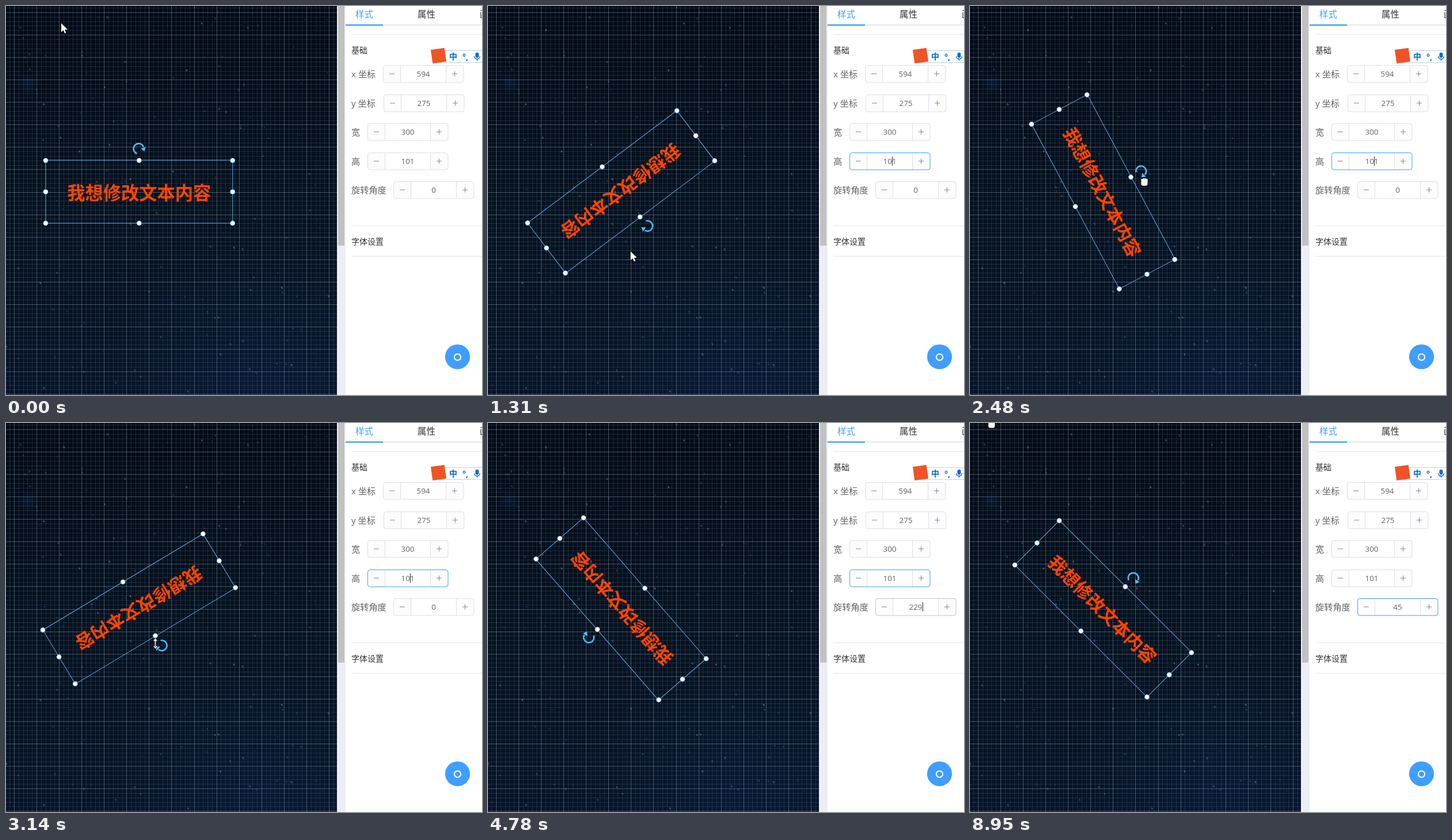
An HTML page with a canvas for the animation above (9.11 s loop, 827 by 677 pixels).

```html
<!DOCTYPE html>
<html lang="zh">
<head>
<meta charset="utf-8">
<title>旋转角度</title>
<style>
html, body { margin: 0; width: 100%; height: 100%; overflow: hidden; background: #fff; }
canvas { display: block; width: 827px; height: 677px; }
</style>
</head>
<body>
<canvas id="stage" width="827" height="677"></canvas>
<script>
const W = 827, H = 677, DESK = 575, LOOP = 9110, TICK = 169;
const view = document.getElementById('stage').getContext('2d');
let g = view;

const FONT = '"Open Sans", "Noto Sans CJK SC", "Noto Sans CJK", sans-serif';
const BLUE = '#409eff', EDGE = '#dcdfe6', HOVER = '#c0c4cc', INK = '#303133', GREY = '#606266';
const MID = { x: 231.3, y: 323.4 }, HALF_W = 162.4, HALF_H = 54.6;

const TURN = [[3, 0], [5, 47], [7, 143], [14, 422], [18, 509], [21, 589]];

const clamp = (v, lo, hi) => Math.max(lo, Math.min(hi, v));
const mix = (a, b, k) => a + (b - a) * k;
const rad = deg => deg * Math.PI / 180;
const tickAt = t => Math.floor((t - 90) / TICK);

function track(at, keys) {
  const i = keys.findIndex(k => at < k[0]);
  if (i === 0) return keys[0][1];
  if (i < 0) return keys[keys.length - 1][1];
  const [t0, a] = keys[i - 1], [t1, b] = keys[i];
  return mix(a, b, (at - t0) / (t1 - t0));
}

function rect(x, y, w, h, color) {
  g.fillStyle = color;
  g.fillRect(x, y, w, h);
}

function dot(x, y, r, color) {
  g.fillStyle = color;
  g.beginPath();
  g.arc(x, y, r, 0, 7);
  g.fill();
}

function ring(x, y, r, width, color, from = 0, to = 7) {
  g.strokeStyle = color;
  g.lineWidth = width;
  g.beginPath();
  g.arc(x, y, r, from, to);
  g.stroke();
}

function poly(...points) {
  g.beginPath();
  points.forEach(([x, y]) => g.lineTo(x, y));
  g.closePath();
}

function text(s, x, y, size, color, align = 'left', weight = 400) {
  g.font = `${weight} ${size}px ${FONT}`;
  g.fillStyle = color;
  g.textAlign = align;
  g.fillText(s, x, y + size * 0.37);
}

function at(x, y, angle, draw) {
  g.save();
  g.translate(x, y);
  g.rotate(angle);
  draw();
  g.restore();
}

function randomizer(seed) {
  return () => (seed = (seed * 16807) % 2147483647) / 2147483647;
}

function glow(x, y, r, alpha) {
  const f = g.createRadialGradient(x, y, 0, x, y, r);
  f.addColorStop(0, `rgba(20,55,120,${alpha})`);
  f.addColorStop(1, 'rgba(20,55,120,0)');
  rect(x - r, y - r, 2 * r, 2 * r, f);
}

function drawSky() {
  const sky = g.createLinearGradient(0, 0, 0, H);
  sky.addColorStop(0, '#040a17');
  sky.addColorStop(0.5, '#061220');
  sky.addColorStop(1, '#071328');
  rect(0, 0, DESK, H, sky);
  glow(440, 660, 260, 0.16);
  glow(38, 135, 18, 0.3);

  const rnd = randomizer(4711);
  for (let i = 0; i < 280; i++) {
    const x = rnd() * DESK, y = rnd() * H, size = rnd(), alpha = 0.2 + rnd() * 0.35;
    g.fillStyle = size > 0.65 ? `rgba(125,155,180,${alpha})` : `rgba(40,85,150,${alpha})`;
    g.beginPath();
    g.ellipse(x, y, 0.8 + size * 0.5, 1 + size * 1.2, -0.5, 0, 7);
    g.fill();
  }

  const step = 39.07 / 5;
  for (let i = -2; i < 88; i++) {
    const color = i % 5 ? 'rgba(150,175,190,.16)' : 'rgba(165,185,195,.4)';
    rect(Math.round(14 + i * step), 0, 1, H, color);
    rect(0, Math.round(11 + i * step), DESK, 1, color);
  }
}

function drawInputBar() {
  const ink = '#0b6bd0', line = '#b9d3ee';
  rect(752, 77, 75, 22, line);
  rect(752, 78, 75, 20, '#fff');
  at(751.5, 86.5, -0.14, () => rect(-12, -12, 24, 24, '#ee5426'));
  text('中', 777, 88, 14, ink, 'center', 700);
  text('°,', 793, 89, 14, ink, 'left', 700);

  g.fillStyle = ink;
  g.beginPath();
  g.roundRect(815.5, 81, 6, 9, 3);
  g.fill();
  ring(818.5, 87.5, 4.8, 1.4, ink, 0, Math.PI);
  rect(817.8, 92, 1.4, 3, ink);
}

function drawPanel() {
  rect(DESK, 0, 15, H, '#eceef5');
  rect(577, 0, 11, 417, '#c1c1c1');
  rect(590, 0, W - 590, H, '#fff');
  ['样式', '属性', '画'].forEach((s, i) => text(s, 607 + 108 * i, 14, 15.4, i ? INK : BLUE));
  rect(590, 32, 237, 2, '#e4e7ed');
  rect(590, 32, 65, 2.4, BLUE);
  for (const y of [49, 382, 435]) rect(600, y, 227, 1, '#e4e6ec');
  text('基础', 600, 77, 14, INK);
  text('字体设置', 600, 410, 14, INK);
  drawInputBar();
  dot(784.5, 610.5, 21.6, BLUE);
  ring(784.5, 611, 5.6, 2, '#fff');
}

function spinner(x, y, value, border) {
  const w = 140, h = 30, mark = '#85888e';
  g.beginPath();
  g.roundRect(x + 0.5, y + 0.5, w - 0.5, h - 0.5, 4);
  g.fillStyle = '#fcfcfd';
  g.fill();
  rect(x + 30, y + 1, 80, h - 1, EDGE);
  rect(x + 31, y + 1, 78, h - 1, '#fff');
  g.strokeStyle = border;
  g.lineWidth = 1;
  g.stroke();
  rect(x + 11, y + 14.5, 9, 1, mark);
  rect(x + 120, y + 14.5, 9, 1, mark);
  rect(x + 124, y + 10.5, 1, 9, mark);
  text(value, x + 70, y + 15, 13.5, GREY, 'center');
}

function angleText(t) {
  if (t < 3640) return '0';
  if (t < 6830) return '229'.slice(0, 3 - clamp(Math.floor((t - 4970) / 163), 0, 3));
  return '45'.slice(0, t < 6970 ? 1 : 2);
}

function drawFields(t) {
  const value = angleText(t);
  const high = t >= 620 && t < 4970 ? BLUE : EDGE;
  const turn = t < 3960 ? EDGE : t < 4970 ? HOVER : BLUE;
  const rows = [['x 坐标', 655, '594'], ['y 坐标', 656, '275'], ['宽', 628, '300'],
    ['高', 628, '101', high], ['旋转角度', 673, value, turn]];
  rows.forEach(([label, x, v, border = EDGE], i) => {
    const y = Math.round(103 + 50.5 * i);
    text(label, 600, y + 15, 15.2, GREY);
    spinner(x, y, v, border);
  });

  if (t >= 620 && t < 4450) rect(702, 262, 1, 16, '#222');
  const lit = (t >= 4780 && t < 7470) || (t >= 8110 && t < 8620);
  if (lit) rect(743 + value.length * 4, 312, 1, 16, '#222');
}

function drawBox(deg) {
  at(MID.x, MID.y, rad(deg), () => {
    g.strokeStyle = '#62abeb';
    g.lineWidth = 1;
    g.strokeRect(-HALF_W, -HALF_H - 0.6, HALF_W * 2, HALF_H * 2 + 0.6);
    text('我想修改文本内容', 0, 2, 31.25, '#ff4500', 'center', 700);
    for (const i of [-1, 0, 1]) for (const j of [-1, 0, 1]) {
      if (!i && !j) continue;
      dot(i * HALF_W, j * HALF_H, 4.4, '#59a9ed');
      dot(i * HALF_W, j * HALF_H, 3.7, '#fff');
    }
    const sky = '#52bdf3';
    ring(-0.8, -75, 9, 2.6, sky, 1.9, 5.95);
    poly([2.7, -75.5], [11.5, -78], [9, -70.5]);
    g.fillStyle = sky;
    g.fill();
  });
}

function paint() {
  g.stroke();
  g.fill();
}

function arrow() {
  poly([0, 0], [0, 15.5], [3.6, 12], [6, 17.5], [8.3, 16.4], [6, 11.2], [11, 11]);
  paint();
}

function hand() {
  g.beginPath();
  g.roundRect(-5, -1, 11, 8, 3);
  for (let i = 0; i < 4; i++) g.roundRect(-5 + 2.8 * i, -5 - Math.sin(i), 2.8, 8, 1.4);
  paint();
}

function resize() {
  g.beginPath();
  g.rect(-0.8, -6, 1.6, 12);
  for (const s of [-1, 1]) {
    g.moveTo(0, 9 * s);
    g.lineTo(3.5, 4.5 * s);
    g.lineTo(-3.5, 4.5 * s);
    g.closePath();
  }
  paint();
}

function pointer(t, deg) {
  const n = tickAt(t);
  if (n < 3) {
    const k = (n + 1) / 4;
    return [mix(96, 231, k), mix(30, 247, k), arrow];
  }
  if (n <= 21) {
    // The mouse runs ahead of the handle, then closes in on it
    const a = rad(deg + Math.min(7 * (n - 3), 42 - 2 * n));
    const r = Math.min(76 + 8 * (n - 3), 60 + 45 * 0.84 ** (n - 7));
    const shape = n === 18 ? resize : r > 77 ? arrow : hand;
    return [MID.x + Math.sin(a) * r, MID.y - Math.cos(a) * r, shape];
  }
  if (n === 22) return [460, 348, arrow];
  if (t < 8620) return null;
  const k = Math.floor((t - 8620) / 165) + 1;
  return [mix(743, 37, k / 3), mix(320, 1.5, k / 3), k < 3 ? arrow : hand];
}

function drawPointer(t, deg) {
  const p = pointer(t, deg);
  if (!p) return;
  g.fillStyle = '#fff';
  g.strokeStyle = '#111';
  g.lineWidth = 1.4;
  at(p[0], p[1], 0, p[2]);
}

const back = document.createElement('canvas');
back.width = W;
back.height = H;
g = back.getContext('2d');
drawSky();
drawPanel();
g = view;

const start = performance.now();

function frame() {
  const t = (performance.now() - start) % LOOP;
  const deg = t >= 7470 ? 45 : track(tickAt(t), TURN);
  g.drawImage(back, 0, 0);
  drawFields(t);
  drawBox(deg);
  drawPointer(t, deg);
  requestAnimationFrame(frame);
}
frame();
</script>
</body>
</html>
```
